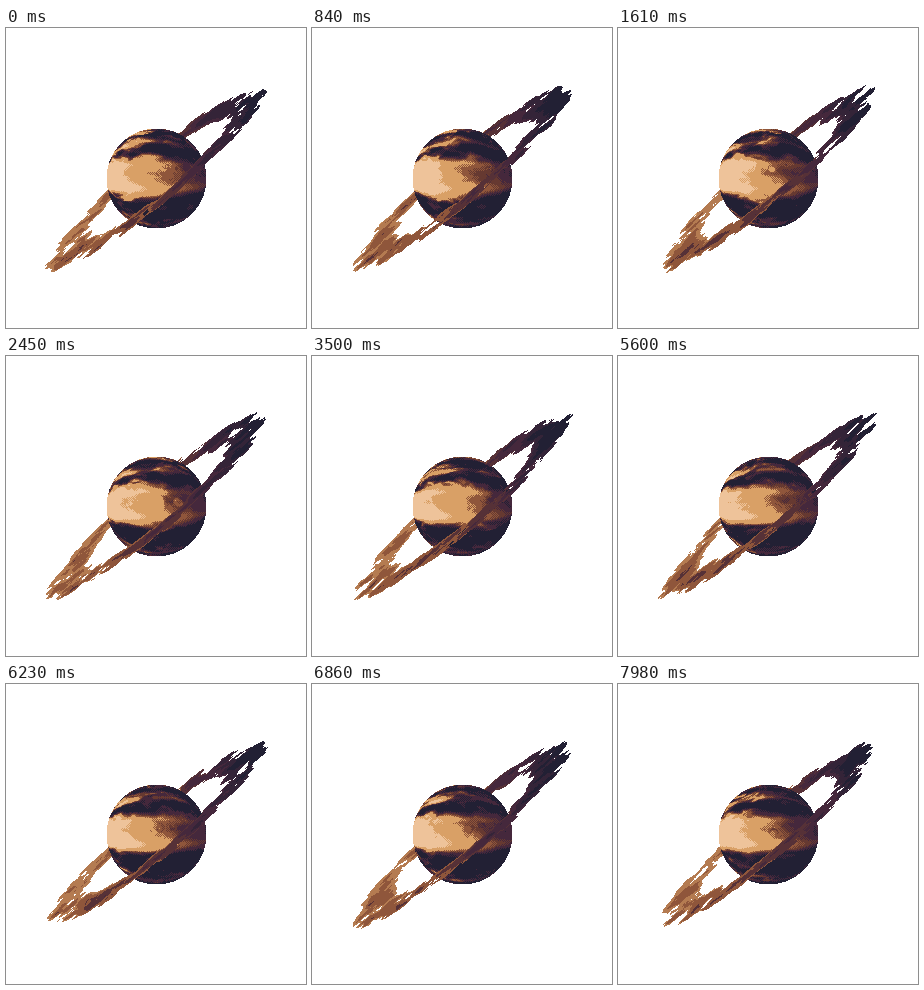
Recreate the animation shown at these times as an HTML page with a canvas. Size 300 by 300 pixels, loop 8 s.

```html
<!DOCTYPE html>
<html lang="en">
<head>
<meta charset="utf-8">
<title>Ringed planet</title>
<style>
  html, body { margin: 0; width: 100%; height: 100%; overflow: hidden; background: #fff; }
  canvas { display: block; width: 100vw; height: 100vh; image-rendering: pixelated; }
</style>
</head>
<body>
<canvas id="stage" width="300" height="300"></canvas>
<script>
const SIDE = 300, LOOP = 8000, STEP = 70, CYCLE = 21000;
const SEED = 9.28;
const LIGHT = [-0.1, 0.3];
const BRIGHT = [[238, 195, 154], [217, 160, 102], [143, 86, 59]];
const DARK = [[102, 57, 49], [69, 40, 60], [34, 32, 52]];

const ctx = document.getElementById('stage').getContext('2d');
const image = ctx.createImageData(SIDE, SIDE);

const mod = (a, n) => ((a % n) + n) % n;
const fract = v => v - Math.floor(v);
const smooth = (a, b, v) => {
  const t = Math.min(1, Math.max(0, (v - a) / (b - a)));
  return t * t * (3 - 2 * t);
};
const rotate = (x, y, angle) => {
  const c = Math.cos(angle), s = Math.sin(angle);
  x -= 0.5; y -= 0.5;
  return [x * c - y * s + 0.5, x * s + y * c + 0.5];
};

// Colour from a three-stop gradient
function ramp(stops, v) {
  const p = Math.min(1, Math.max(0, v)) * 2;
  const i = Math.min(1, Math.floor(p)), f = p - i;
  return stops[i].map((c, k) => Math.round(c + (stops[i + 1][k] - c) * f));
}

// Tiling value noise over a lattice twice as wide as it is high
function makeNoise(rows, octaves) {
  const cols = rows * 2;
  const grid = new Float64Array(cols * rows);
  for (let y = 0; y < rows; y++) {
    for (let x = 0; x < cols; x++) {
      grid[y * cols + x] = fract(Math.sin(x * 12.9898 + y * 78.233) * 15.5453 * SEED);
    }
  }
  const rand = (x, y) => grid[mod(y, rows) * cols + mod(x, cols)];
  const noise = (x, y) => {
    const ix = Math.floor(x), iy = Math.floor(y);
    const u = smooth(0, 1, x - ix), v = smooth(0, 1, y - iy);
    const top = rand(ix, iy) * (1 - u) + rand(ix + 1, iy) * u;
    const low = rand(ix, iy + 1) * (1 - u) + rand(ix + 1, iy + 1) * u;
    return top + (low - top) * v;
  };
  const fbm = (x, y) => {
    let sum = 0, scale = 0.5;
    for (let i = 0; i < octaves; i++) {
      sum += noise(x, y) * scale;
      x *= 2; y *= 2; scale *= 0.5;
    }
    return sum;
  };
  return { rand, fbm };
}

const GAS_SIZE = 10.107, BANDS = 0.892, PLANET = 100;
const RING_SIZE = 15, RING_WIDTH = 0.143, TILT = 0.7, FLATTEN = 6;
const gas = makeNoise(10, 3);
const dust = makeNoise(15, 4);

// Soft round storms
function spot(x, y) {
  const row = Math.floor(y);
  x += row * 0.31;
  const h = gas.rand(Math.floor(x), row);
  const d = Math.hypot(fract(x) - 0.25 - h * 0.5, y - row - 0.25 - h * 0.5);
  return smooth(0, h * 0.25 + 1e-9, d * 0.75);
}

function turbulence(x, y, drift) {
  let sum = 0;
  for (let i = 11; i <= 20; i++) {
    sum += spot(x * GAS_SIZE * 0.3 + i + drift, y * GAS_SIZE * 0.3 + i);
  }
  return sum;
}

// Everything that does not change with time, worked out once per pixel
function planetPixels() {
  const list = [];
  for (let j = 0; j < PLANET; j++) {
    for (let i = 0; i < PLANET; i++) {
      const u = i / PLANET, v = j / PLANET;
      if (Math.hypot(u - 0.5, v - 0.5) > 0.49999) continue;
      const cx = u * 2 - 1, cy = v * 2 - 1;
      const z = Math.sqrt(Math.max(0, 1 - cx * cx - cy * cy));
      const x = cx / (z + 1) * 0.5 + 0.5, y = cy / (z + 1) * 0.5 + 0.5;
      list.push({
        at: ((j + 100) * SIDE + i + 100) * 4, x, y,
        light: Math.hypot(u - LIGHT[0], v - LIGHT[1]),
        band: gas.fbm(0, y * GAS_SIZE * BANDS) ** 2 * 7,
        warp: gas.fbm(x * GAS_SIZE, y * GAS_SIZE),
        odd: (i + j) % 2 === 0
      });
    }
  }
  return list;
}

function ringPixels() {
  const list = [];
  for (let j = 0; j < SIDE; j++) {
    for (let i = 0; i < SIDE; i++) {
      const u = i / SIDE, v = j / SIDE;
      const [x, y] = rotate(u, v, TILT);
      const behind = y < 0.5 && Math.hypot(x - 0.5, y - 0.5) < 1 / 6;
      const flatY = (y - 0.5) * FLATTEN;
      const d = Math.hypot(x - 0.5, flatY);
      const body = smooth(0.5 - RING_WIDTH * 2, 0.5 - RING_WIDTH, d) * smooth(d - RING_WIDTH, d, 0.4);
      if (behind || body < 0.28) continue;
      const light = Math.hypot(u - LIGHT[0], v - LIGHT[1]);
      list.push({ at: (j * SIDE + i) * 4, x, y: flatY + 0.5, body, shade: light * light * 2 });
    }
  }
  return list;
}

const planet = planetPixels();
const ring = ringPixels();
const tones = Array.from({ length: 5 }, (_, i) => [ramp(BRIGHT, i / 4), ramp(DARK, i / 4)]);

function put(at, color) {
  image.data[at] = color[0];
  image.data[at + 1] = color[1];
  image.data[at + 2] = color[2];
}

function drawPlanet(drift) {
  for (const p of planet) {
    const turb = turbulence(p.x, p.y, drift);
    let cloud = gas.fbm(
      p.x * GAS_SIZE + p.warp - drift + turb,
      p.y * 2 * GAS_SIZE + p.warp + turb
    ) * p.band;
    const light = cloud + p.light * 1.8;
    cloud += p.light - 0.3;
    // Past this point the upper edge falls below the lower one
    let value = cloud >= 4.2 ? 1 : smooth(-0.2, 4 - cloud, light);
    if (p.odd) value *= 1.1;
    const level = Math.floor(value * 4);
    const color = value < 0.625 ? BRIGHT[Math.min(2, level)] : DARK[Math.min(2, Math.max(0, level - 2))];
    put(p.at, color);
  }
}

function drawRing(angle) {
  for (const p of ring) {
    const [x, y] = rotate(p.x, p.y, angle);
    const density = p.body * dust.fbm(x * RING_SIZE, y * RING_SIZE);
    if (density < 0.28) continue;
    const level = Math.floor((density + p.shade) * 4);
    put(p.at, level <= 4 ? tones[level][0] : tones[Math.min(4, level - 4)][1]);
  }
}

let shown = -1;
function frame(now) {
  const time = Math.floor((now % LOOP) / STEP) * STEP;
  if (time !== shown) {
    shown = time;
    image.data.fill(255);
    drawPlanet(time / CYCLE * 20);
    drawRing(time / CYCLE * Math.PI * 10);
    ctx.putImageData(image, 0, 0);
  }
  requestAnimationFrame(frame);
}
frame(performance.now());
</script>
</body>
</html>
```
